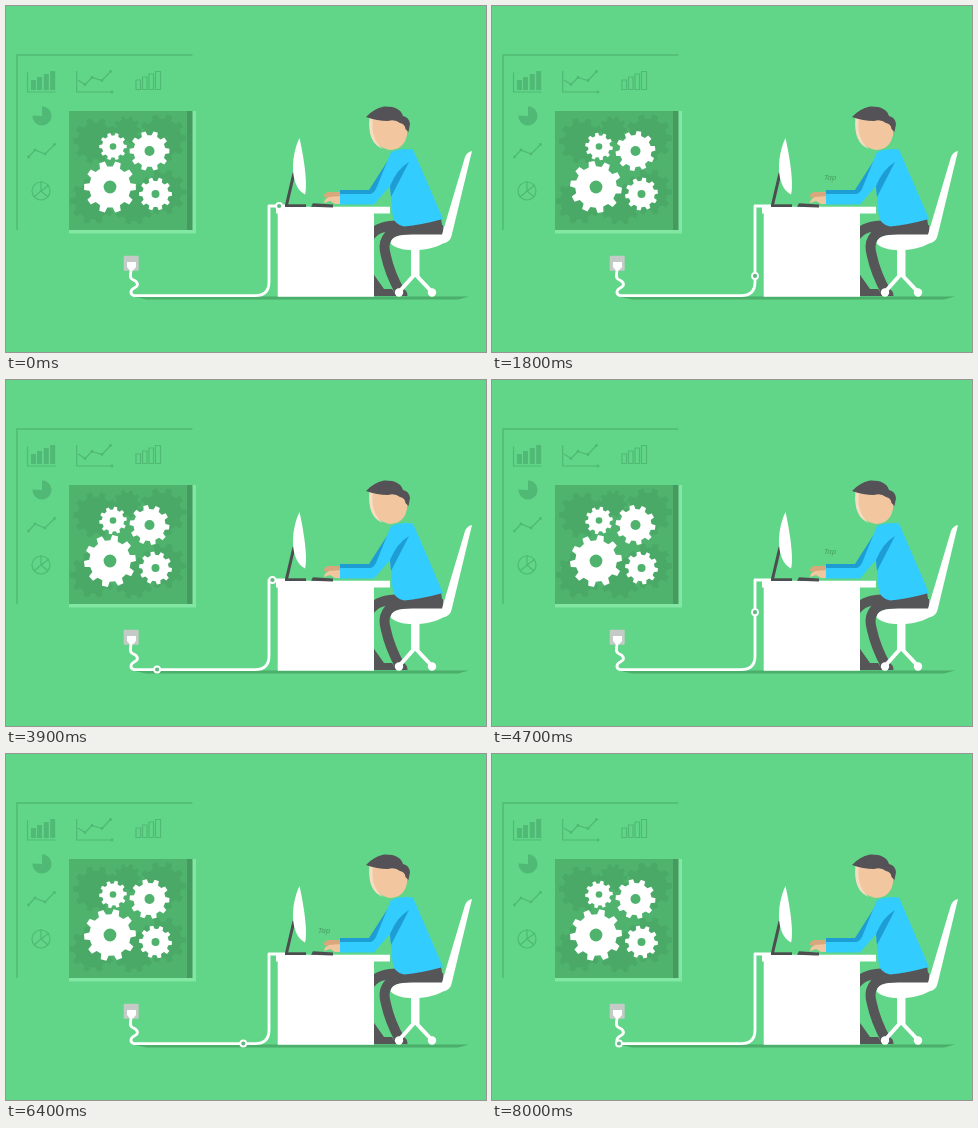
These frames come from a looping animation (480x346 px, 8.1 s). An HTML page:

```html
<!DOCTYPE html>
<html lang="en">
<head>
<meta charset="utf-8">
<title>At the desk</title>
<style>
html, body { margin: 0; width: 100%; height: 100%; overflow: hidden; background: #61d688; }
svg { display: block; width: 100%; height: 100%; }
text { font-family: "Open Sans", "Noto Sans", sans-serif; font-style: italic; fill: #469d62; }
.icon { fill: none; stroke: #50b975; stroke-width: 1.2; }
.solid { fill: #50b975; stroke: none; }
.dark { fill: #565557; }
.limb { fill: none; stroke: #565557; stroke-width: 10; }
.cable { fill: none; stroke: #fff; stroke-width: 2.8; stroke-linejoin: round; }
</style>
</head>
<body>
<svg viewBox="0 0 480 346" preserveAspectRatio="none">
  <rect width="480" height="346" fill="#61d688"/>

  <!-- wall board -->
  <g class="icon">
    <path d="M11 224V49H186.500" stroke-width="1.5"/>
    <path d="M21.500 66.500V86H49.500"/>
    <path class="solid" d="M25 74h5v10h-5zM31 71h5v13h-5zM37.800 68h5v16h-5zM44.200 65h5v19h-5z"/>
    <path d="M70.700 65V86H106"/>
    <path d="M72 74L79 78.500L86 71.500L96 74.500L104.500 65.500"/>
    <path d="M130 74h4.500v9.500h-4.500zM136.500 71h4.500v12.500h-4.500zM143 68h4.500v15.500h-4.500zM149.500 65.500h5v18h-5z"/>
    <path class="solid" d="M36 110V100.300A9.600 9.600 0 1 1 26.400 109.500Z"/>
    <path d="M22.500 151L29 144L39 148L48.500 138.500"/>
    <circle cx="35" cy="185" r="9"/>
    <path d="M35 175V185L28 191M35 185L42 191M35 185L43 179"/>
    <g id="dots" class="solid"></g>
  </g>

  <!-- machine panel -->
  <path d="M63 105H190V227.500H63Z" fill="#82e7a3"/>
  <rect x="63" y="105" width="118" height="119" fill="#4fb26d"/>
  <rect x="181" y="105" width="5.500" height="119" fill="#459a5f"/>
  <clipPath id="inside"><rect x="63" y="105" width="118" height="119"/></clipPath>
  <g id="shades" fill="#4aa966" clip-path="url(#inside)"></g>
  <g id="gears" fill="#fff"></g>

  <!-- floor shadow and cable -->
  <path d="M127 290.500H463L452 293.500H140Z" fill="#4bae6a"/>
  <rect x="117.700" y="249.700" width="15" height="15" rx="1" fill="#c4cac6"/>
  <path d="M121 256H130V261L127.500 264H123.500L121 261Z" fill="#fff"/>
  <path class="cable" d="M125.500 262C124.500 268 123 272 126.500 273.500C132 275.500 133 279.500 129 281.500C124 284 123.500 288 128 289.700H249Q263 289.700 263 276V200H282"/>

  <!-- far leg -->
  <path class="limb" d="M396 219C380 220 371 221 364 230"/>
  <path class="dark" d="M366 266L378 283H386Q389 286 388 290H366Z"/>

  <!-- desk -->
  <path d="M270 200.700H384V207.500H368V290.700H271.700V207.500H270Z" fill="#fff"/>
  <g id="rings"></g>
  <path d="M288 167L280.500 199" stroke="#4d4c4f" stroke-width="3"/>
  <path d="M279 198.300H300V201H279Z" fill="#4d4c4f"/>
  <path d="M293.500 132C284 152 284 181 299 188.500C302 178 297.500 150 293.500 132Z" fill="#fff"/>
  <path d="M307 197.300L327 198.500V201.500L305 200.700Z" fill="#4d4c4f"/>

  <!-- far arm and hands -->
  <path d="M386 148L363 184H334V190H366L390 160Z" fill="#1d9dd3"/>
  <path d="M334 186H322Q318 187 317.500 191L334 194Z" fill="#d9a77c"/>
  <path d="M335 190L323 191Q318 193 318 197L324 195L329 198H335Z" fill="#f1c59d"/>

  <!-- near leg -->
  <path class="dark" d="M388 220L435 212L437.500 229H388Z"/>
  <path class="limb" d="M437 224H398C380 225 376 237 380 250C383 264 388 275 394 286"/>
  <path class="dark" d="M386 290Q387 283 395 282Q402 284 401.500 290Z"/>

  <!-- body and head -->
  <path d="M385 146Q394 142 407 143.500L437 213Q415 219 398 220.500Q387 218 386.500 208L384 180L368 198.500H334V188H365Q368 187 370 183Z" fill="#33ccff"/>
  <path d="M403 156L385 191L384 180Q391 163 403 156Z" fill="#1d9dd3"/>
  <path d="M363.500 112Q380 108 397 112Q402 119 401 129Q398 144 383 144Q362 139 363.500 112Z" fill="#f2c69f"/>
  <path d="M363.500 112L367 111Q364 133 377 143Q361 137 363.500 112Z" fill="#f5dcc2"/>
  <path d="M360 111Q367 103 378 100.500Q394 100 397 110Q403 111 404 118L402.500 126L399.500 123Q399 118 394 117Q389 113 382 115Q371 115 360 111Z" fill="#545256"/>

  <!-- chair -->
  <g fill="#fff">
    <path d="M384.500 237C386 229 396 228.500 412 228.500H436L459 151Q461 146 466 145L445.500 230Q444 236 437 237.500C421 247 390 246 384.500 237Z"/>
    <path d="M405 242H413.500V271H405Z"/>
    <path d="M409 268L393 286M409 268L426 286" stroke="#fff" stroke-width="4"/>
    <circle cx="393" cy="286.500" r="4.200"/>
    <circle cx="426" cy="286.500" r="4.200"/>
  </g>

  <g id="taps"></g>
</svg>
<script>
const LOOP = 8100;
const NS = "http://www.w3.org/2000/svg";
const $ = id => document.getElementById(id);

function add(parent, tag, attrs) {
  const node = parent.appendChild(document.createElementNS(NS, tag));
  set(node, attrs);
  return node;
}

function set(node, attrs) {
  for (const key in attrs) node.setAttribute(key, attrs[key]);
}

function gearPath(r, teeth) {
  const step = 2 * Math.PI / teeth, root = r * 0.8;
  const corners = [[-0.29, root], [-0.18, r], [0.18, r], [0.29, root]];
  let points = [];
  for (let i = 0; i < teeth; i++) {
    for (const [shift, radius] of corners) {
      const a = (i + shift) * step;
      points.push((radius * Math.cos(a)).toFixed(2) + " " + (radius * Math.sin(a)).toFixed(2));
    }
  }
  return "M" + points.join("L") + "Z";
}

// x, y, radius, hole, turns per loop
const gears = [
  [104, 181, 26, 6.4, 1],
  [143.500, 145, 20, 5, -1],
  [107, 140.500, 13.800, 3.300, 1],
  [149.500, 188, 16.500, 4, -1]
].map(([x, y, r, hole, turns]) => {
  const node = add($("gears"), "path", { d: gearPath(r, 10) });
  add($("gears"), "circle", { cx: x, cy: y, r: hole, fill: "#4fb26d" });
  return { x, y, turns, node };
});

for (const [x, y, r] of [[90, 135, 23], [156, 132, 24], [87, 195, 23], [157, 186, 23], [128, 198, 21], [121, 124, 14]]) {
  add($("shades"), "path", { d: gearPath(r, 10), transform: `translate(${x} ${y})` });
}

for (const [x, y] of [[79, 78.5], [86, 71.5], [96, 74.5], [104.5, 65.5], [22.5, 151], [29, 144], [39, 148], [48.5, 138.5], [106, 86]]) {
  add($("dots"), "circle", { cx: x, cy: y, r: 1.4 });
}

// Distance along the cable against time since the ring set off
const travel = [[0, 0], [1900, 84.5], [2500, 109], [4270, 231]];
const rings = [-20, 3730].map(start => ({
  start,
  node: add($("rings"), "circle", { r: 3, fill: "#61b982", stroke: "#fff", "stroke-width": 1.8 })
}));

function distance(s) {
  for (let i = 1; i < travel.length; i++) {
    const [t0, d0] = travel[i - 1], [t1, d1] = travel[i];
    if (s <= t1) return d0 + (d1 - d0) * (s - t0) / (t1 - t0);
  }
  return 231;
}

function cablePoint(d) {
  if (d < 11) return [274 - d, 200];
  if (d < 87) return [263, 189 + d];
  if (d < 109) {
    const a = (d - 87) / 22 * Math.PI / 2;
    return [249 + 14 * Math.cos(a), 276 + 13.5 * Math.sin(a)];
  }
  return [358 - d, 289.5];
}

// x, baseline, size, weight, shown from, shown until, fade
const taps = [
  [332, 174, 8, 400, 700, 1950, 150],
  [312, 179, 8, 400, 2450, 3320, 120],
  [306, 162, 11, 700, 2850, 3700, 150]
].map(([x, y, size, weight, from, until, fade]) => {
  const node = add($("taps"), "text", { x, y, "font-size": size, "font-weight": weight });
  node.textContent = "Tap";
  return { node, from, until, fade };
});

function draw(t) {
  for (const g of gears) {
    set(g.node, { transform: `translate(${g.x} ${g.y}) rotate(${360 * g.turns * t / LOOP})` });
  }
  for (const { start, node } of rings) {
    const s = t - start;
    const [cx, cy] = cablePoint(distance(Math.max(0, s)));
    set(node, { cx, cy, visibility: s >= 0 && s < 4370 ? "visible" : "hidden" });
  }
  const phase = t < 3800 ? t : t - 3800;
  for (const { node, from, until, fade } of taps) {
    const level = Math.min((phase - from) / fade, (until - phase) / fade, 1);
    set(node, { opacity: Math.max(0, level) });
  }
}

const begin = performance.now();
function tick() {
  const t = (performance.now() - begin) % LOOP;
  draw(Math.floor(t / 100) * 100);
  requestAnimationFrame(tick);
}
tick();
</script>
</body>
</html>
```
